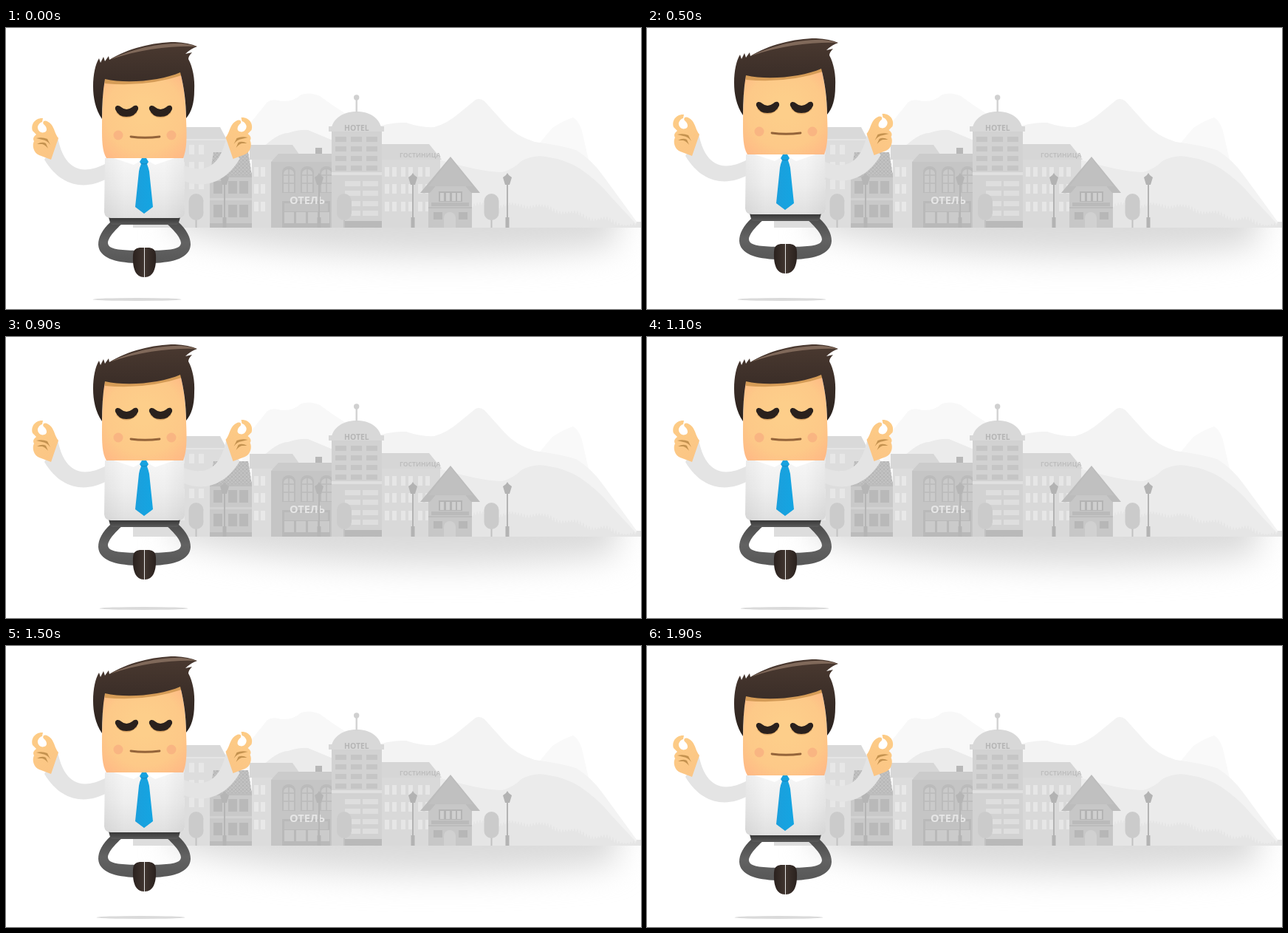
Animation of 860x380 px, one loop 2000 ms. Source, as an HTML page with a canvas:

```html
<!DOCTYPE html>
<html lang="ru">
<head>
<meta charset="utf-8">
<title>Meditation</title>
<style>
html, body { margin: 0; width: 100%; height: 100%; overflow: hidden; background: #fff; }
canvas { display: block; }
</style>
</head>
<body>
<canvas id="stage" width="860" height="380"></canvas>
<script>
const W = 860, H = 380;
const stage = document.getElementById('stage').getContext('2d');

function layer(draw) {
  const canvas = document.createElement('canvas');
  canvas.width = W;
  canvas.height = H;
  draw(canvas.getContext('2d'));
  return canvas;
}

function shape(c, d, fill) {
  c.fillStyle = fill;
  c.fill(new Path2D(d));
}

function line(c, d, color, width) {
  c.strokeStyle = color;
  c.lineWidth = width;
  c.stroke(new Path2D(d));
}

function box(c, x, y, w, h, fill) {
  c.fillStyle = fill;
  c.fillRect(x, y, w, h);
}

function grid(c, xs, ys, w, h, fill) {
  for (const x of xs) for (const y of ys) box(c, x, y, w, h, fill);
}

function oval(c, x, y, rx, ry, fill) {
  c.fillStyle = fill;
  c.beginPath();
  c.ellipse(x, y, rx, ry, 0, 0, Math.PI * 2);
  c.fill();
}

function ramp(c, x0, y0, x1, y1, ...colors) {
  const g = c.createLinearGradient(x0, y0, x1, y1);
  colors.forEach((color, i) => g.addColorStop(i / (colors.length - 1), color));
  return g;
}

function sign(c, text, x, y, size, color) {
  c.font = `bold ${size}px "Open Sans", "Noto Sans", sans-serif`;
  c.fillStyle = color;
  c.fillText(text, x, y);
}

// Draws once as is and once flipped around the vertical line x = axis / 2
function pair(c, axis, draw, lift = 0) {
  draw();
  c.save();
  c.translate(axis, lift);
  c.scale(-1, 1);
  draw();
  c.restore();
}

function drawGround(c) {
  c.save();
  c.beginPath();
  c.rect(0, 270, W, 110);
  c.clip();
  c.filter = 'blur(22px)';
  shape(c, 'M225 220H835L825 294Q690 312 520 307Q340 302 225 272Z', '#dadada');
  c.restore();
}

function drawMountains(c) {
  shape(c, 'M320 150L333 126L354 100Q361 95 373 99Q389 100 400 90Q411 86 425 92Q441 104 460 116L490 145V200H320Z', '#f8f8f8');
  shape(c, 'M715 165L740 135Q755 125 768 121Q776 126 780 139L789 178Z', '#f9f9f9');
  shape(c, 'M490 137Q520 127 542 128Q562 135 580 134Q598 129 614 115L636 97Q642 94 648 99L675 129Q690 146 716 154Q748 158 772 165Q793 178 808 199L860 270H490Z', '#f3f3f3');
  shape(c, 'M345 164Q368 142 382 142Q398 137 409 138Q426 145 445 153V200H345Z', '#ebebeb');
  shape(c, 'M570 172Q590 180 608 184Q650 195 672 195Q687 191 698 180Q714 171 731 174Q758 178 777 190Q802 207 819 228L858 270H570Z', '#ebebeb');

  c.fillStyle = '#e5e5e5';
  c.beginPath();
  c.moveTo(610, 270);
  for (let i = 0, x = 612; x < 856; i++, x += 4) {
    const y = 239 + Math.max(0, x - 715) * 0.21 + 3 * Math.sin(i * 0.6);
    const tip = 4 + 3 * Math.abs(Math.sin(i * 12.9));
    c.lineTo(x, Math.min(268, y + 4));
    c.lineTo(x + 2, Math.min(266, y + 4 - tip));
  }
  c.lineTo(860, 262);
  c.lineTo(860, 270);
  c.fill();
}

function drawLeftBlock(c) {
  box(c, 172, 150, 128, 120, '#dddddd');
  shape(c, 'M180 134H290L299 151H172Z', '#d9d9d9');
  box(c, 172, 150, 127, 2, '#e4e4e4');
  grid(c, [235, 248, 261], [158, 181, 205, 235], 7, 13, '#e7e7e7');

  box(c, 333, 176, 70, 94, '#dcdcdc');
  shape(c, 'M330 158H388L402 178H330Z', '#d7d7d7');
  grid(c, [336, 345], [188, 211, 235], 6, 13, '#e8e8e8');

  box(c, 276, 196, 57, 74, '#c9c9c9');
  shape(c, 'M281 168H328L333 200H276Z', '#c2c2c2');
  c.save();
  c.clip(new Path2D('M281 168H328L333 200H276Z'));
  for (let x = 240; x < 370; x += 5) {
    line(c, `M${x} 168l32 32M${x} 200l32 -32`, '#b5b5b5', 1);
  }
  c.restore();
  box(c, 276, 199, 57, 3, '#bdbdbd');
  box(c, 276, 230, 57, 3, '#d2d2d2');
  grid(c, [281, 301, 316], [207, 239], 12, 17, '#b9b9b9');
  box(c, 276, 264, 57, 6, '#bcbcbc');
}

function drawInn(c) {
  box(c, 419, 162, 9, 9, '#b7b7b7');
  shape(c, 'M369 170H447L456 181H359Z', '#cbcbcb');
  box(c, 359, 181, 97, 89, '#c5c5c5');
  for (const x of [376, 401, 427]) {
    shape(c, `M${x - 2} 223V195a9 8 0 0 1 18 0V223Z`, '#bbbbbb');
    shape(c, `M${x} 222V197a7 6 0 0 1 14 0V222Z`, '#cacaca');
    line(c, `M${x + 7} 190V222M${x} 199h14M${x} 210h14`, '#bbbbbb', 1.5);
  }
  box(c, 374, 234, 65, 36, '#b9b9b9');
  grid(c, [377, 393, 409, 425], [249], 13, 15, '#cbcbcb');
  box(c, 377, 237, 59, 11, '#c2c2c2');
  sign(c, 'ОТЕЛЬ', 384, 238, 14.6, '#e6e6e6');
}

function drawTower(c) {
  shape(c, 'M441 134C445 120 459 113 475 113C491 113 504 120 508 134Z', '#d8d8d8');
  box(c, 473.5, 95, 2.5, 20, '#d4d4d4');
  oval(c, 474.7, 94, 3.7, 3.7, '#d0d0d0');
  box(c, 441, 139, 68, 131, '#d2d2d2');
  box(c, 437, 133, 75, 7, '#d8d8d8');
  sign(c, 'HOTEL', 458, 138.5, 10.4, '#b5b5b5');
  grid(c, [446, 467, 488], [147, 160, 173, 186], 15, 7, '#c5c5c5');
  box(c, 441, 195, 68, 4, '#e0e0e0');
  grid(c, [459, 483], [207, 220, 234, 247], 21, 7, '#dedede');
  box(c, 458, 261, 51, 9, '#b9b9b9');
}

function drawGuestHouse(c) {
  box(c, 509, 177, 79, 93, '#d9d9d9');
  shape(c, 'M509 157H573L590 178H509Z', '#d6d6d6');
  sign(c, 'ГОСТИНИЦА', 533, 175, 8.6, '#bebebe');
  grid(c, [513, 523, 535, 545, 558, 568], [188, 211, 235], 6, 13, '#e6e6e6');
}

function drawChalet(c) {
  shape(c, 'M572 270V216L602 181L631 216V270Z', '#c7c7c7');
  shape(c, 'M602 174L642 223H630L602 190L574 223H561Z', '#bcbcbc');
  shape(c, 'M602 176L632 214H572Z', '#c0c0c0');
  box(c, 586, 221, 32, 14, '#b4b4b4');
  grid(c, [588, 596, 604, 611], [223], 5, 11, '#cfcfcf');
  box(c, 576, 236, 51, 5, '#bababa');
  line(c, 'M572 243H631', '#b8b8b8', 1.5);
  grid(c, [579, 613], [249], 12, 10, '#b7b7b7');
  shape(c, 'M593 270V257a8 8 0 0 1 16 0V270Z', '#d1d1d1');
}

function drawTree(c, x) {
  box(c, x - 1, 250, 2, 20, '#c2c2c2');
  c.fillStyle = '#cbcbcb';
  c.beginPath();
  c.roundRect(x - 10, 224, 20, 36, 10);
  c.fill();
}

function drawLamp(c, x, color) {
  shape(c, `M${x} 196l2 3l4 3l-3 10h-6l-3 -10l4 -3Z`, color);
  box(c, x - 1, 211, 2, 50, color);
  box(c, x - 2.5, 256, 5, 14, color);
}

const backdrop = layer(c => {
  box(c, 0, 0, W, H, '#fff');
  drawGround(c);
  drawMountains(c);
  drawLeftBlock(c);
  drawGuestHouse(c);
  drawInn(c);
  drawTower(c);
  drawChalet(c);
  [257.5, 458, 657.5].forEach(x => drawTree(c, x));
  [296, 424].forEach(x => drawLamp(c, x, '#b5b5b5'));
  [551, 679].forEach(x => drawLamp(c, x, '#b3b3b3'));
});

function drawLegs(c) {
  const trousers = ramp(c, 0, 262, 0, 318, '#4c4c4c', '#626262', '#575757');
  pair(c, 375, () => shape(c,
    'M142 262C130 273 125 283 125 293C126 311 148 317 176 318V301C155 300 139 300 138 291C138 283 150 271 159 263Z', trousers));
  const shoe = ramp(c, 172, 0, 187, 0, '#2a211e', '#40352f');
  pair(c, 375, () => shape(c, 'M187 297H181Q172 298 172 307C171 326 176 337 187 337Z', shoe));
  box(c, 187, 297, 1, 40, '#e6e6e6');
}

function drawHand(c) {
  const skin = ramp(c, 36, 124, 66, 176, '#fdcc86', '#fbc585');
  shape(c, 'M50 122C40 121 33 130 36 139L41 144C37 147 36 150 38 153C35 158 37 169 45 172L61 178L71 149C66 143 66 136 61 130Q55 124 51 126Q49 129 52 131C56 135 56 140 52 141C47 143 42 138 43 133Q45 128 49 127Z', skin);
  shape(c, 'M41 149Q49 147 56 150L60 158Q56 152 49 151Z', '#c4924f');
  shape(c, 'M42 157Q49 153 54 156L57 163Q53 158 49 157Z', '#c4924f');
}

function drawArms(c) {
  pair(c, 368.5, () => {
    shape(c, 'M70 148C76 178 92 206 136 183V204C108 219 75 216 52 178Z', '#e4e4e4');
    drawHand(c);
  }, -1);
}

function drawTorso(c) {
  shape(c, 'M139 256H236L234 263Q233 266 230 266H145Q142 266 141 263Z', ramp(c, 0, 257, 0, 266, '#383838', '#5a5a5a'));
  shape(c, 'M134 176H241L242 250Q241 257 233 257H142Q134 257 133 249Z',
    ramp(c, 0, 176, 0, 257, '#f6f6f6', '#eeeeee', '#e0e0e0'));
  const side = ramp(c, 133, 0, 242, 0, '#0000000c', '#00000000', '#00000000', '#00000000', '#0000000c');
  shape(c, 'M134 176H241L242 250Q241 257 233 257H142Q134 257 133 249Z', side);
  shape(c, 'M146 176H228L202 185L187 177L173 185Z', '#ffffff');
  shape(c, 'M184 176H190L193 181L191 184Q193 189 194 194L199 242L187 251L175 242L180 194Q181 188 183 184L181 181Z',
    ramp(c, 175, 0, 199, 0, '#1b9fdc', '#14a5e2'));
  line(c, 'M183 183Q187 185 191 183', '#1589c2', 1);
}

function drawFace(c) {
  const glow = c.createRadialGradient(187, 112, 15, 187, 118, 76);
  glow.addColorStop(0, '#fdce8a');
  glow.addColorStop(0.6, '#fdc988');
  glow.addColorStop(1, '#ffb985');
  shape(c, 'M133 64H237C242 85 244 105 244 125C245 148 245 164 240 176H136C130 166 130 151 130 135C130 110 131 88 133 64Z', glow);
  shape(c, 'M133 66Q183 74 237 58L238 64Q190 80 134 75Z', '#d59c57');

  for (const x of [152, 224]) oval(c, x, 145, 6.5, 6.5, '#f9b582');
  for (const x of [148, 194]) {
    c.save();
    c.translate(x, 0);
    line(c, 'M2 114Q15 127 29 114', '#dda766', 2);
    shape(c, 'M0 110C-1 104 5 104 8 107Q15 113 23 107C27 103 32 105 31 110Q27 120 15 120Q4 120 0 110Z', '#2a211d');
    c.restore();
  }
  c.lineCap = 'round';
  line(c, 'M169 147Q188 149.5 208 147', '#94643a', 2.8);
  c.lineCap = 'butt';
}

function drawHair(c) {
  const hair = ramp(c, 0, 20, 0, 122, '#4a3930', '#3b2e28', '#29211d');
  shape(c, 'M130 123C121 110 118 94 118 79C118 63 121 49 126 41L128 47L132 39L134 45L139 38L140 43C164 28 199 19 229 19Q248 20 259 25Q250 28 243 35L252 33Q247 38 247 42C253 53 256 69 255 84C255 102 251 114 244 122C244 101 241 79 236 60C211 71 165 76 134 69C131 86 130 105 130 123Z', hair);
  shape(c, 'M140 43C175 26 212 20 238 21Q250 22 258 25C224 24 184 28 140 43Z', '#80695a');
}

const figure = layer(c => {
  drawLegs(c);
  drawArms(c);
  drawTorso(c);
  drawFace(c);
  drawHair(c);
});

function render(now) {
  const step = Math.floor(now / 100) % 20;
  const lift = 10 - Math.abs(10 - step);
  stage.drawImage(backdrop, 0, 0);
  oval(stage, 177.5 + lift, 367, 60, 2, '#dadada');
  stage.drawImage(figure, 0, -lift);
}

const start = performance.now();
function tick() {
  render(performance.now() - start);
  requestAnimationFrame(tick);
}
tick();
</script>
</body>
</html>
```
